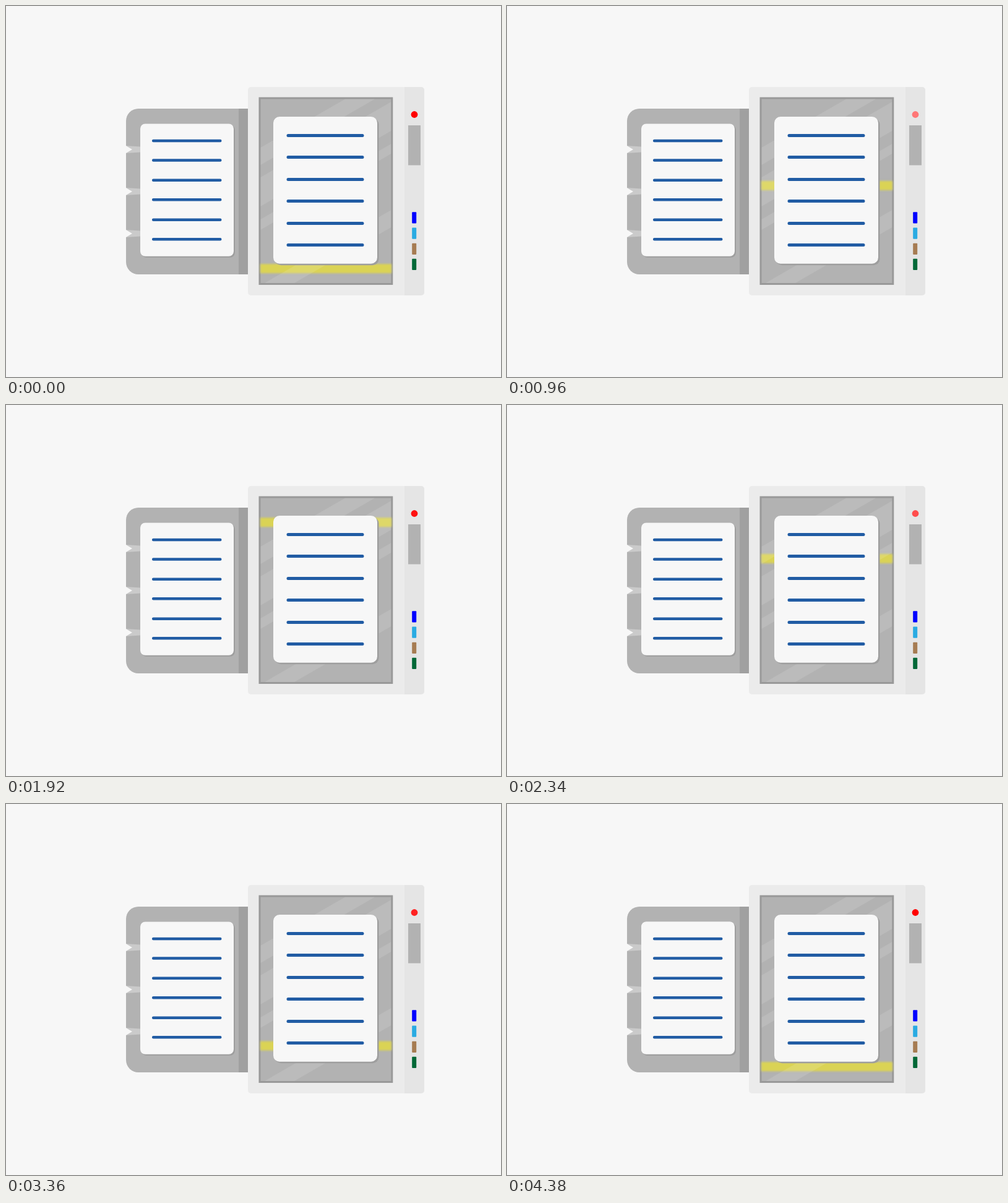
An HTML page that plays this animation: 800x600 px, repeating every 4510 ms.

```html
<!DOCTYPE html>
<html lang="en">
<head>
<meta charset="utf-8">
<title>Document scanner</title>
<style>
  html, body { margin: 0; width: 100%; height: 100%; overflow: hidden; background: #f7f7f7; }
  svg { display: block; width: 100%; height: 100%; }
  .grey { fill: #b2b2b2; }
  .paper { fill: #f7f7f7; }
  .shadow { fill: #9e9e9e; }
  .text { fill: none; stroke: #215ca4; stroke-linecap: round; }

  .beam, .led, .sheet { animation: 4510ms infinite; }
  .beam { animation-name: scan; }
  .led { animation-name: pulse; fill: #f00; }
  .sheet { animation-name: eject; }

  /* 1800 ms up, 1800 ms down, in 30 ms ticks */
  @keyframes scan {
    0% { transform: translateY(0); animation-timing-function: steps(60); }
    39.9113% { transform: translateY(-251.8px); animation-timing-function: steps(60); }
    79.8226%, 100% { transform: translateY(0); }
  }
  @keyframes pulse {
    0%, 39.9113% { fill: #f00; animation-timing-function: steps(30); }
    19.9557%, 59.8670% { fill: #ff8080; animation-timing-function: steps(30); }
    79.8226%, 100% { fill: #f00; }
  }
  /* the finished copy slides out from 3600 to 4350 ms */
  @keyframes eject {
    0%, 79.8226% { transform: translateX(220px); animation-timing-function: steps(25); }
    96.4523%, 100% { transform: translateX(0); }
  }
</style>
</head>
<body>
<svg viewBox="0 0 800 600">
  <defs>
    <filter id="glow" filterUnits="userSpaceOnUse" x="395" y="400" width="245" height="50">
      <feGaussianBlur stdDeviation="1.8"/>
    </filter>
    <g id="copy">
      <rect class="shadow" x="219" y="192.5" width="151" height="214.3" rx="8"/>
      <rect class="paper" x="217" y="190.5" width="151" height="214.3" rx="8"/>
      <path class="text" stroke-width="4.6" d="M238.2 218h108M238.2 249.5h108M238.2 281.8h108M238.2 313.3h108M238.2 345.8h108M238.2 377.3h108"/>
    </g>
    <g id="notch">
      <path fill="#cacaca" d="M194 226L217 227.6V236.4L194 238z"/>
      <path class="paper" d="M193 225.4L204 232L193 238.6z"/>
    </g>
  </defs>

  <!-- folder -->
  <path class="grey" d="M392 166H214a20 20 0 0 0 -20 20V414a20 20 0 0 0 20 20H392z"/>
  <path fill="#a0a0a0" d="M376 166h16v268h-16z"/>
  <use href="#notch"/>
  <use href="#notch" y="68"/>
  <use href="#notch" y="136"/>
  <use href="#copy"/>
  <g class="sheet"><use href="#copy"/></g>

  <!-- scanner body -->
  <rect fill="#ebebeb" x="391" y="131" width="285" height="337" rx="5"/>
  <path fill="#e5e5e5" d="M644 131h27a5 5 0 0 1 5 5v327a5 5 0 0 1 -5 5h-27z"/>
  <rect class="grey" x="410" y="149" width="213.8" height="300.5" stroke="#999" stroke-width="3"/>
  <g class="beam">
    <rect x="411" y="417.2" width="212" height="15" fill="#dad355" filter="url(#glow)"/>
  </g>
  <g fill="#fff" fill-opacity=".12">
    <path d="M548 150.5H596L411.5 257V229z"/>
    <path d="M622.3 155V202L411.5 324V277z"/>
    <path d="M622.3 223V239L411.5 362V345z"/>
    <path d="M622.3 330V358L466 448H418z"/>
  </g>

  <!-- page on the glass -->
  <rect class="shadow" x="434.5" y="181.5" width="168" height="237.8" rx="10"/>
  <rect class="paper" x="432" y="179" width="168" height="237.8" rx="10"/>
  <path class="text" stroke-width="5" d="M456 209.5h120M456 244.5h120M456 280.5h120M456 315.5h120M456 351.5h120M456 386.5h120"/>

  <!-- controls -->
  <circle class="led" cx="660" cy="175.5" r="5.4"/>
  <rect class="grey" x="650" y="193" width="20" height="64.5"/>
  <rect fill="#00f" x="656.2" y="333.3" width="7" height="18.2" rx="1"/>
  <rect fill="#29abe2" x="656.2" y="358.5" width="7" height="18.2" rx="1"/>
  <rect fill="#a67c52" x="656.2" y="383.7" width="7" height="18.2" rx="1"/>
  <rect fill="#006837" x="656.2" y="408.8" width="7" height="18.2" rx="1"/>
</svg>
</body>
</html>
```
